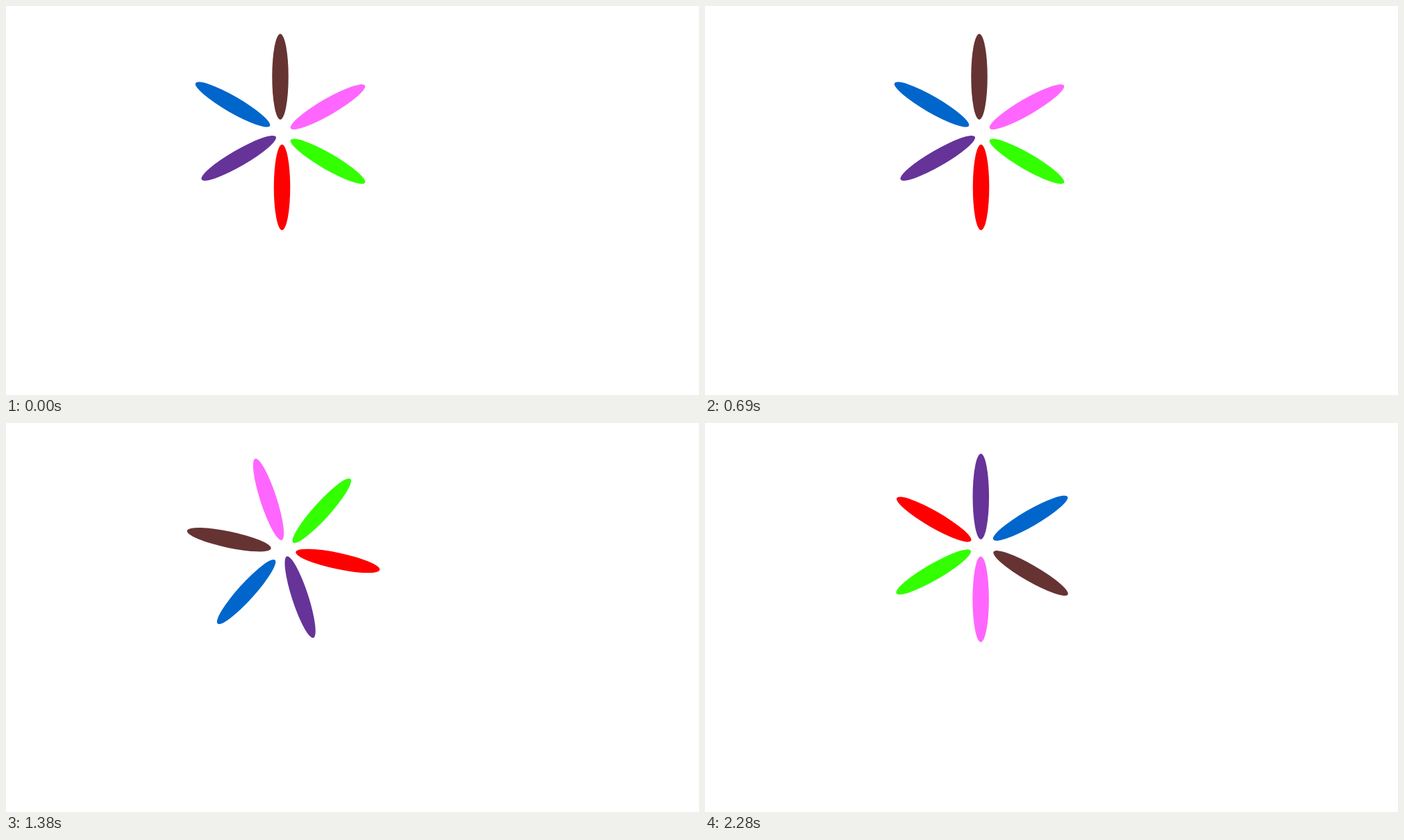
These frames come from a looping animation (998x561 px, 5.4 s). An HTML page:

```html
<!DOCTYPE html>
<html lang="en">
<head>
<meta charset="utf-8">
<title>Spinning petals</title>
<style>
  html, body { margin: 0; width: 100%; height: 100%; overflow: hidden; background: #fff; }
  svg { display: block; width: 998px; height: 561px; }
</style>
</head>
<body>
<svg viewBox="0 0 998 561"><g id="flower"></g></svg>
<script>
const LOOP = 5400, STEP = 30;
const PIVOT = [398.95, 180.65];
const flower = document.getElementById('flower');

// Petal colour, centre and tilt in the starting pose
const petals = [
  ['#663333', 395, 102, 90],
  ['#ff66ff', 463.5, 145.5, -30],
  ['#33ff00', 463.5, 224, 30],
  ['#ff0000', 397.5, 261.5, 90],
  ['#663399', 335.2, 219.4, -30],
  ['#0066cc', 326.5, 142, 30],
];
for (const [fill, x, y, tilt] of petals) {
  const petal = document.createElementNS('http://www.w3.org/2000/svg', 'ellipse');
  const attributes = {
    rx: 61.75, ry: 11.75, fill,
    transform: `translate(${x} ${y}) rotate(${tilt})`,
  };
  for (const name in attributes) petal.setAttribute(name, attributes[name]);
  flower.append(petal);
}

// Each turn runs between two steps; positive ease slows towards its end
const turns = [
  { start: 0, end: 19, from: 0, sweep: 120, ease: 0.05 },
  { start: 19, end: 39, from: 120, sweep: -600, ease: 0 },
  { start: 39, end: 59, from: 240, sweep: 120, ease: 0 },
  { start: 59, end: 76, from: 0, sweep: 120, ease: -0.275 },
];

function angleAt(step) {
  const turn = turns.find(({ end }) => step < end) || turns[turns.length - 1];
  const t = Math.min(1, (step - turn.start) / (turn.end - turn.start));
  return turn.from + turn.sweep * (t + turn.ease * t * (1 - t));
}

function draw() {
  const step = Math.floor((performance.now() % LOOP) / STEP);
  flower.setAttribute('transform', `rotate(${angleAt(step)} ${PIVOT.join(' ')})`);
  requestAnimationFrame(draw);
}
draw();
</script>
</body>
</html>
```
